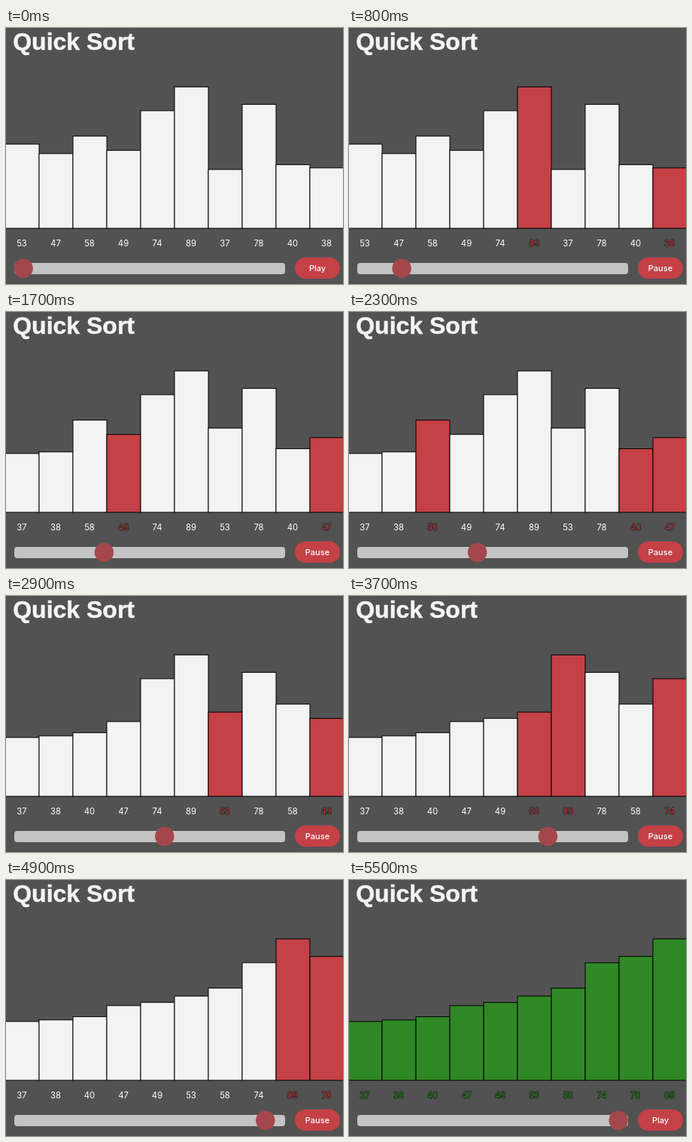
These frames come from a looping animation (448x340 px, 5600 ms). An HTML page:

```html
<!DOCTYPE html>
<html lang="en">
<head>
<meta charset="utf-8">
<title>Quick Sort</title>
<style>
  html, body { margin: 0; width: 100%; height: 100%; overflow: hidden; background: #525252; }
  svg { display: block; width: 448px; height: 340px; }
  .title { font: bold 32px "Liberation Sans", Arial, sans-serif; }
  .label, .button { font: 11.3px Inter, sans-serif; text-anchor: middle; }
  .button { font-size: 11px; font-weight: 500; }
  .label { paint-order: stroke; }
</style>
</head>
<body>
<svg id="stage" viewBox="0 0 448 340">
  <rect width="448" height="340" fill="#525252"/>
  <text class="title" x="9.2" y="28.7" fill="#f4f4f4" stroke="#f4f4f4" stroke-width="0.5">Quick Sort</text>
  <g id="chart"></g>
  <rect x="11" y="312" width="360" height="15" rx="4" fill="#c3c3c3"/>
  <circle id="knob" cy="319.3" r="12.7" fill="#a4474c"/>
  <rect x="384" y="304.7" width="60" height="28.3" rx="14" fill="#c44146"/>
  <text id="button" class="button" x="414" y="323" fill="#fff">Play</text>
</svg>
<script>
const TICK = 100, LOOP = 5600;
const BASE = 266, PITCH = 45, SCALE = 2.11;
const WHITE = '#f3f3f3', RED = '#c44146', GREEN = '#2f8825';

// Record every visible step of a quick sort that pivots on the last item.
function trace(input) {
  const a = [...input], steps = [];
  const log = (...active) => steps.push({ values: [...a], active });
  const swap = (i, j, ...extra) => {
    log(i, j, ...extra);
    [a[i], a[j]] = [a[j], a[i]];
    log(i, j, ...extra);
  };
  const sort = (lo, hi) => {
    if (lo >= hi) return;
    let i = lo;
    for (let j = lo; j < hi; j++) {
      log(j, hi);
      if (a[j] < a[hi]) swap(i++, j, hi);
    }
    swap(i, hi);
    sort(lo, i - 1);
    sort(i + 1, hi);
  };
  log();
  sort(0, a.length - 1);
  log();
  steps[steps.length - 1].done = true;
  return steps;
}

const start = [53, 47, 58, 49, 74, 89, 37, 78, 40, 38];
const steps = trace(start);
const last = steps.length - 1;

const $ = id => document.getElementById(id);
const chart = $('chart'), knob = $('knob'), button = $('button');
const set = (el, attrs) => {
  for (const k in attrs) el.setAttribute(k, attrs[k]);
  return el;
};
const add = (name, attrs) =>
  chart.appendChild(set(document.createElementNS('http://www.w3.org/2000/svg', name), attrs));

const columns = start.map((_, i) => ({
  bar: add('rect', { x: PITCH * i - 1, width: PITCH, stroke: '#000' }),
  label: add('text', { class: 'label', x: PITCH * i + 21, y: 290 })
}));

const clamp = n => Math.max(0, Math.min(last, n));

function draw(time) {
  const tick = Math.floor(time % LOOP / TICK);
  const { values, active, done } = steps[clamp(tick - 2)];

  columns.forEach(({ bar, label }, i) => {
    const lit = done || active.includes(i);
    const fill = done ? GREEN : lit ? RED : WHITE;
    const height = values[i] * SCALE;
    set(bar, { y: BASE - height, height, fill });
    set(label, { fill: lit ? fill : '#fff', stroke: lit ? '#000' : 'none', 'stroke-width': 0.9 });
    label.textContent = values[i];
  });

  // The slider runs one tick ahead of the bars.
  knob.setAttribute('cx', 23.2 + 335 * clamp(tick - 1) / last);
  button.textContent = tick >= 1 && !done ? 'Pause' : 'Play';
}

let origin;
function loop(now) {
  origin ??= now;
  draw(now - origin);
  requestAnimationFrame(loop);
}
draw(0);
requestAnimationFrame(loop);
</script>
</body>
</html>
```
